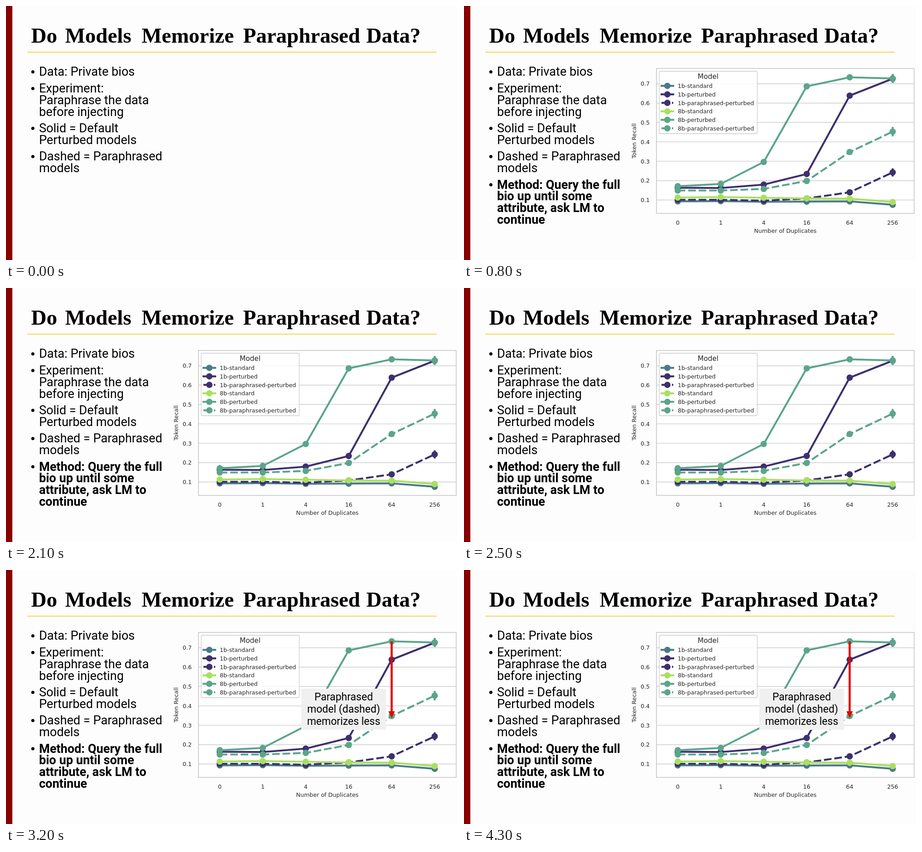
Recreate the animation shown at these times as an HTML page. Size 998x561 px, loop 4.4 s.

```html
<!DOCTYPE html>
<html lang="en">
<head>
<meta charset="utf-8">
<style>
  html, body { margin: 0; width: 100%; height: 100%; overflow: hidden; background: #fdfdfd; }
  svg { display: block; }
  .title { font: bold 47px "Liberation Serif", serif; }
  .body { font: 27.15px Roboto, sans-serif; }
  .bold { font-weight: bold; }
  .note { font: 23px Roboto, sans-serif; text-anchor: middle; }
  .chart { font: 12.65px "DejaVu Sans", sans-serif; fill: #262626; }
  .mid { text-anchor: middle; }
  .end { text-anchor: end; }
</style>
</head>
<body>
<svg id="stage" width="998" height="561" viewBox="0 0 998 561"></svg>
<script>
const LOOP = 4400, CHART_AT = 800, NOTE_AT = 2800;
const INDIGO = '#3e2f6f', GREEN = '#5ba58a', TEAL = '#4a7b86', LIME = '#a9e05f';

const text = (x, y, str, cls = '', extra = '') => `<text x="${x}" y="${y}" class="${cls}" ${extra}>${str}</text>`;
const rect = (x, y, w, h, attrs) => `<rect x="${x}" y="${y}" width="${w}" height="${h}" ${attrs}/>`;
const dot = (x, y, r, fill) => `<circle cx="${x}" cy="${y}" r="${r}" fill="${fill}"/>`;
const path = (d, stroke, width, extra = '') =>
  `<path d="${d}" fill="none" stroke="${stroke}" stroke-width="${width}" ${extra}/>`;

function bullet(baseline, lines, cls = '') {
  return dot(59.3, baseline - 8.8, 3.5, '#000') +
    lines.map((line, i) => text(72.9, baseline + i * 25.8, line, 'body ' + cls)).join('');
}

// Point heights are in stage pixels; error is half the last error bar.
const series = [
  { name: '1b-standard', color: TEAL, ys: [431.5, 431, 432.5, 432, 431.5, 439], error: 0 },
  { name: '1b-perturbed', color: INDIGO, ys: [401.5, 402, 394.5, 371, 198, 160.5], error: 9 },
  { name: '1b-paraphrased-perturbed', color: INDIGO, dashed: true, ys: [428, 428, 430, 425, 411.5, 367.5], error: 9 },
  { name: '8b-standard', color: LIME, ys: [423, 422, 423.5, 425, 425.5, 433], error: 0 },
  { name: '8b-perturbed', color: GREEN, ys: [398, 393, 344.5, 177.5, 157.5, 160], error: 10 },
  { name: '8b-paraphrased-perturbed', color: GREEN, dashed: true, ys: [407.5, 407.5, 404, 386.5, 322.5, 277.5], error: 10.5 },
];
const xAt = i => 472 + 94.9 * i;
const lineStyle = s => s.dashed ? 'stroke-dasharray="16.8 6.3"' : 'stroke-linecap="square" stroke-linejoin="round"';

function plot(s) {
  const d = 'M' + s.ys.map((y, i) => `${xAt(i)} ${y}`).join('L');
  const bar = s.error ? path(`M${xAt(5)} ${s.ys[5] - s.error}v${2 * s.error}`, s.color, 4.2) : '';
  return path(d, s.color, 4.2, lineStyle(s)) + bar + s.ys.map((y, i) => dot(xAt(i), y, 7, s.color)).join('');
}

function legend() {
  return rect(431, 144, 216.5, 138, 'rx="3" fill="#fff" fill-opacity=".8" stroke="#ccc" stroke-width="1.3"') +
    text(539, 161.3, 'Model', 'mid', 'style="font-size:15.3px"') +
    series.map((s, i) => {
      const y = 176.4 + i * 18.75;
      return path(`M436 ${y}h26`, s.color, 4.2, lineStyle(s)) + dot(449, y, 7, s.color) + text(472, y + 4.6, s.name);
    }).join('');
}

function chart() {
  let out = rect(425, 138, 569, 320, 'fill="#fff"');
  for (let i = 1; i <= 7; i++) {
    const y = 428.5 - (i - 1) * 42.8;
    out += path(`M425 ${y}h569`, '#ccc', 1.4) + text(410, y + 4.6, '0.' + i, 'end');
  }
  out += series.map(plot).join('');
  out += rect(425, 138, 569, 320, 'fill="none" stroke="#ccc" stroke-width="1.8"') + legend();
  out += [0, 1, 4, 16, 64, 256].map((n, i) => text(xAt(i), 482.8, n, 'mid')).join('');
  out += text(709.5, 501, 'Number of Duplicates', 'mid');
  return out + text(0, 0, 'Token Recall', 'mid', 'transform="translate(380.2 298) rotate(-90)"');
}

function note() {
  const lines = ['Paraphrased', 'model (dashed)', 'memorizes less'];
  return rect(652, 262, 187, 91, 'fill="#f0f0f0"') +
    lines.map((line, i) => text(745.5, 288 + i * 27.2, line, 'note')).join('') +
    path('M851.5 157.5V314', '#e00000', 4.6) +
    '<path d="M844.3 312h14.4l-7.2 15z" fill="#e00000"/>';
}

const title = [[55.5, 'Do'], [130.5, 'Models'], [299.5, 'Memorize'], [523.5, 'Paraphrased'], [795.5, 'Data?']];

document.getElementById('stage').innerHTML =
  rect(0, 0, 998, 561, 'fill="#fdfdfd"') + rect(0, 0, 14, 561, 'fill="#880000"') +
  title.map(([x, word]) => text(x, 81, word, 'title')).join('') +
  path('M47 101.8H951', '#efd43c', 1.8) +
  bullet(154.2, ['Data: Private bios']) +
  bullet(191, ['Experiment:', 'Paraphrase the data', 'before injecting']) +
  bullet(279, ['Solid = Default', 'Perturbed models']) +
  bullet(341.3, ['Dashed = Paraphrased', 'models']) +
  '<g id="results">' +
    bullet(403.5, ['Method: Query the full', 'bio up until some', 'attribute, ask LM to', 'continue'], 'bold') +
    `<g class="chart">${chart()}</g></g>` +
  `<g id="note">${note()}</g>`;

const results = document.getElementById('results'), callout = document.getElementById('note');
const show = (el, on) => el.setAttribute('visibility', on ? 'visible' : 'hidden');

function frame() {
  const t = performance.now() % LOOP;
  show(results, t >= CHART_AT);
  show(callout, t >= NOTE_AT);
  requestAnimationFrame(frame);
}
frame();
</script>
</body>
</html>
```
